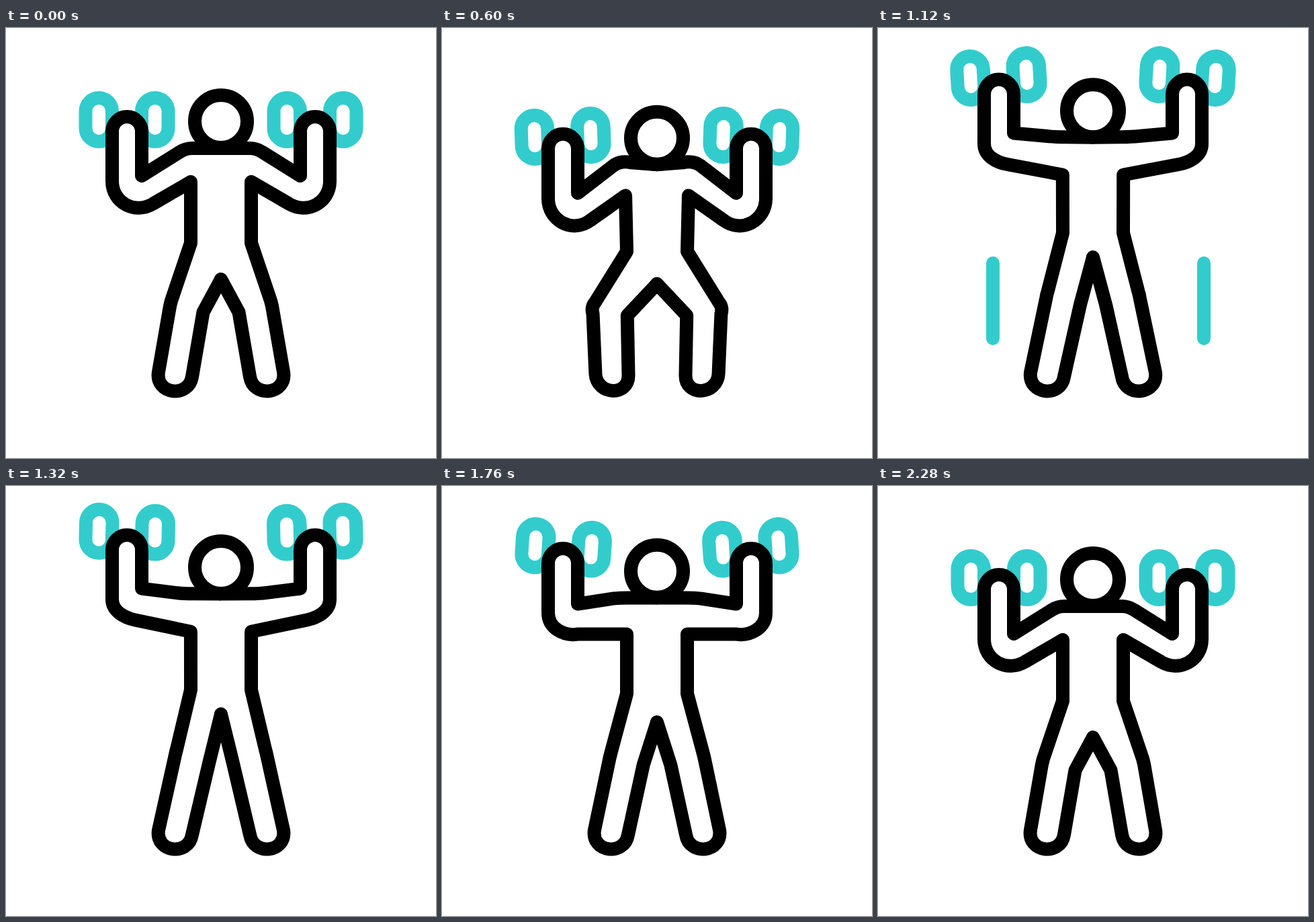
Write an HTML page that moves like this. It is 640 px wide and 640 px high and loops after 2.64 s.

```html
<!DOCTYPE html>
<html lang="en">
<head>
<meta charset="utf-8">
<title>Dumbbell squat</title>
<style>
  html, body { margin: 0; width: 100%; height: 100%; overflow: hidden; background: #fff; }
  svg { display: block; width: 100%; height: 100%; }
</style>
</head>
<body>
<svg viewBox="0 0 640 640" fill="none" stroke-width="20" stroke-linecap="round" stroke-linejoin="round">
  <g stroke="#3cc">
    <path id="speed"/>
    <g id="bar">
      <rect x="118.5" y="-32.5" width="39.5" height="65" rx="19.75"/>
      <rect x="202" y="-32.5" width="39.5" height="65" rx="19.75"/>
    </g>
    <use href="#bar" transform="matrix(-1 0 0 1 640 0)"/>
  </g>
  <g stroke="#000">
    <path id="half" fill="#fff"/>
    <use href="#half" transform="matrix(-1 0 0 1 640 0)"/>
    <circle id="head" cx="320" r="39"/>
  </g>
</svg>
<script>
const LOOP = 2640, STEP = 40;
const el = id => document.getElementById(id);
const lerp = (a, b, k) => a + (b - a) * k;

// Pose: head y | dumbbell y | left half of the body, from neck to crotch
const stand = `139|136.5|M320 179 L277 179 Q267 179 258 185 L202 220 V154 a22 22 0 0 0 -44 0
  V228 C158 260 192 278 219 261.5 L275 229 V320 L246 406 Q245 410 244 414 L227 512
  C221.5 545 271.5 552 277 519 L293.5 423 L320 374`;
const squat = `190|187|M320 229 L287 223 Q265 216 252 226 L202 273 V207 a22 22 0 0 0 -44 0
  V281 C158 315 196 336 222 313 L271 271 L275 346 L209 410 Q197 421 204 438 L230 518
  C240 549 286 546 278 513 L257 433 L320 388`
  .replace("L275 346", "L275 346");
const reach = `120|66.6|M320 159.5 L277 159.5 Q262 159.5 252 158 L202 151 V93.5 a22 22 0 0 0 -44 0
  V167 C158 185 176 194 192 198 L275 216 V303 L254.5 392 Q253.5 396 252.5 400 L227 512
  C221.5 545 271.5 552 277 519 L303 411 L320 339`;

// Blends every number of two poses that share the same commands
function blend(a, b, k) {
  if (typeof a === "number") return lerp(a, b, k);
  const to = b.match(/[\d.]+/g);
  let i = 0;
  return a.replace(/[\d.]+/g, n => +lerp(+n, +to[i++], k).toFixed(3));
}

const fix = pose => pose.replace("V320", "L275 320").replace("V303", "L275 303");
const A = fix(stand), S = squat, T = fix(reach);

// Keys: time, value, and an optional bias of the ease that leads to it
const poseKeys = [[240, A], [920, S, 1.12], [1120, blend(S, T, .955)], [1430, T], [2250, A]];
const tiltKeys = [[240, 0], [920, 6.1, 1.5], [1000, 8], [1240, -1.3], [1560, -1.4], [1820, -4], [2280, 0]];
const tipKeys = [[960, 462], [1120, 350]];
const tailKeys = [[1120, 462], [1320, 350]];

function at(keys, t) {
  const i = keys.findIndex(key => t < key[0]);
  if (i < 0) return keys[keys.length - 1][1];
  if (i === 0) return keys[0][1];
  const [t0, a] = keys[i - 1], [t1, b, bias = 1] = keys[i];
  const x = ((t - t0) / (t1 - t0)) ** bias;
  return blend(a, b, x * x * (3 - 2 * x));
}

function draw(now) {
  const t = Math.floor(now / STEP) * STEP % LOOP;
  const [headY, barY, body] = at(poseKeys, t).split("|");
  el("head").setAttribute("cy", headY);
  el("half").setAttribute("d", body);
  el("bar").setAttribute("transform", `translate(0 ${barY}) rotate(${-at(tiltKeys, t)} 180 10)`);

  const tip = at(tipKeys, t), tail = at(tailKeys, t);
  el("speed").setAttribute("d", tail > tip ? `M171 ${tail}V${tip}M485 ${tail}V${tip}` : "");
  requestAnimationFrame(draw);
}
requestAnimationFrame(draw);
</script>
</body>
</html>
```
